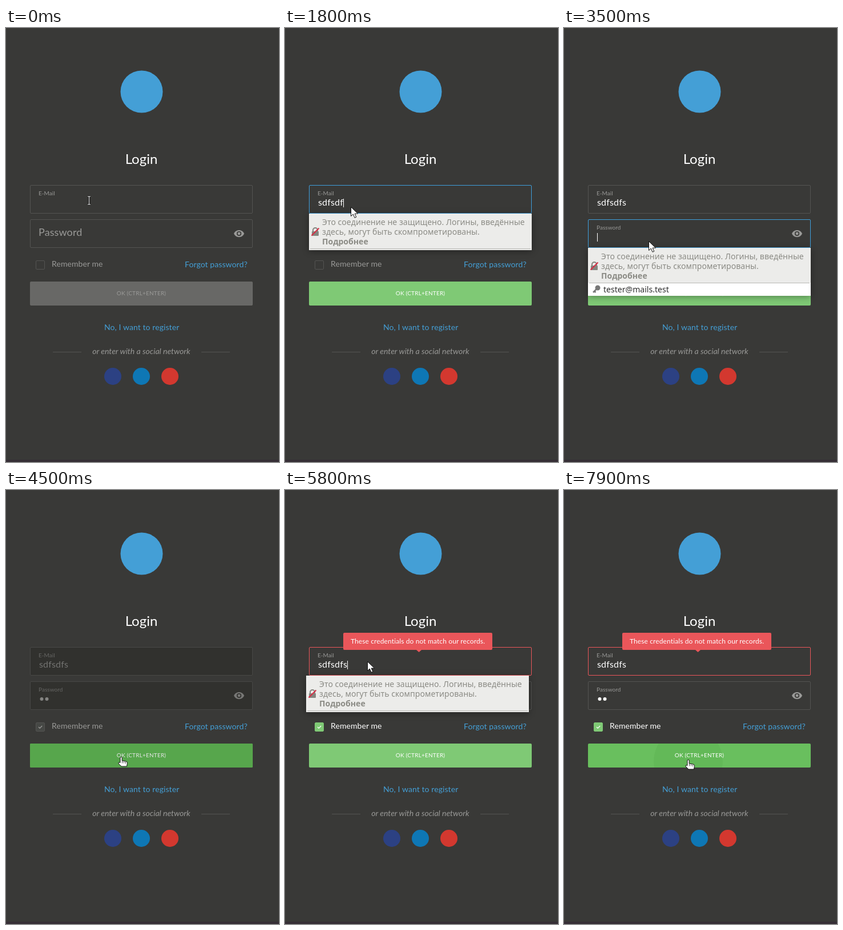
These frames come from a looping animation (478x760 px, 8 s). An HTML page:

```html
<!DOCTYPE html>
<html lang="en">
<head>
<meta charset="utf-8">
<title>Login form</title>
<style>
html, body { margin: 0; width: 100%; height: 100%; overflow: hidden; background: #393937; }
svg { display: block; }
text { font: 14px Lato, sans-serif; letter-spacing: .006em; fill: #999997; }
.small { font-size: 10px; }
.input { font-size: 16px; letter-spacing: .01em; }
.link { fill: #449fd6; }
.mid { text-anchor: middle; }
.box { fill: #31312e; stroke: #545452; }
#popup { filter: drop-shadow(0 2px 6px rgba(0, 0, 0, .35)); }
#popup text { font-family: "Noto Sans", "Open Sans", sans-serif; letter-spacing: .002em; fill: #8b8b85; }
</style>
</head>
<body>
<svg width="478" height="760" viewBox="0 0 478 760">
  <rect y="756" width="478" height="4" fill="#362f36"/>
  <circle cx="237.5" cy="111.5" r="37" fill="#449fd6"/>
  <text class="mid" x="237" y="238" style="font-size:24px;letter-spacing:0;fill:#fff">Login</text>

  <g id="email">
    <rect id="emailBox" class="box" x="42.5" y="275.5" width="389" height="49" rx="1.5"/>
    <text id="emailLabel" class="small" x="57" y="293">E-Mail</text>
    <text class="input" x="58" y="311"><tspan id="emailText"></tspan></text>
    <rect id="emailCaret" y="299" width="1" height="15" fill="#fff"/>
  </g>

  <g id="password">
    <rect id="passBox" class="box" x="42.5" y="335.5" width="389" height="49" rx="1.5"/>
    <text id="passLabel" x="57">Password</text>
    <circle id="dot0" cx="62.5" cy="366" r="3"/>
    <circle id="dot1" cx="71.5" cy="366" r="3"/>
    <rect id="passCaret" y="359" width="1" height="15" fill="#fff"/>
    <path id="eye" fill-rule="evenodd" transform="translate(398.2 350.2) scale(.82)" d="M12 4.5C7 4.5 2.7 7.6 1 12c1.7 4.4 6 7.5 11 7.5s9.3-3.1 11-7.5c-1.7-4.4-6-7.5-11-7.5zM12 17a5 5 0 1 1 0-10 5 5 0 0 1 0 10zm0-8a3 3 0 1 0 0 6 3 3 0 0 0 0-6z"/>
  </g>

  <rect id="check" x="52.5" y="407.5" width="15" height="15" rx="1.5"/>
  <path id="checkMark" d="M57 415l2.2 2.2 4-4.2" fill="none" stroke-width="1.2"/>
  <text id="remember" x="80" y="418">Remember me</text>
  <text class="link" x="313" y="419">Forgot password?</text>

  <clipPath id="clip"><rect x="42" y="444" width="390" height="42" rx="2"/></clipPath>
  <g clip-path="url(#clip)">
    <rect id="button" x="42" y="444" width="390" height="42"/>
    <circle id="ripple" cy="475" fill="#54a349"/>
  </g>
  <text id="buttonText" class="small mid" x="237" y="468" style="letter-spacing:.02em">OK (CTRL+ENTER)</text>

  <text class="link" x="172" y="529">No, I want to register</text>
  <path d="M82 567.5h50M342 567.5h50" stroke="#545452"/>
  <text class="mid" x="237" y="571" style="font-style:italic;letter-spacing:0">or enter with a social network</text>
  <circle cx="187" cy="610" r="15" fill="#2c4183"/>
  <circle cx="237" cy="610" r="15" fill="#0e77b5"/>
  <circle cx="287" cy="610" r="15" fill="#d3382f"/>

  <g id="error">
    <path d="M104 250H361q2 0 2 2V278q0 2-2 2H239l-4.5 4-4.5-4H104q-2 0-2-2V252q0-2 2-2z" fill="#ea565a"/>
    <text class="mid" x="232.5" y="269" style="font-size:12px;letter-spacing:.01em;fill:#fff">These credentials do not match our records.</text>
  </g>

  <g id="popup">
    <rect id="popupBack" width="390"/>
    <rect width="390" height="61" fill="#ececea"/>
    <path d="M2 61.5H388" stroke="#b9b9b5"/>
    <path d="M7 32v-3a4 4 0 0 1 8 0v3" fill="none" stroke="#85857f" stroke-width="2"/>
    <rect x="5" y="31" width="12" height="8" rx="1" fill="#85857f"/>
    <path d="M4.5 38.5L17.5 25.5" stroke="#d92d45" stroke-width="2"/>
    <text x="23" y="20">Это соединение не защищено. Логины, введённые</text>
    <text x="23" y="37">здесь, могут быть скомпрометированы.</text>
    <text x="23" y="54" style="font-weight:700">Подробнее</text>
    <g id="saved">
      <path d="M9 78l6-6m-3.500 4l2 2" stroke="#777" stroke-width="2.5"/>
      <circle cx="17" cy="70" r="4.5" fill="#777"/>
      <text x="27" y="78" style="fill:#2e2e2e">tester@mails.test</text>
    </g>
  </g>

  <g id="cursor" fill="#fff" stroke="#111">
    <g id="beam">
      <path d="M-2.5-7.5h5M-2.5 6.5h5M0-7.5v14" stroke-width="3"/>
      <path d="M-2.5-7.5h5M-2.5 6.5h5M0-7.5v14" stroke="#fff"/>
    </g>
    <path id="arrow" d="M0 0V16l3.8-3.5 2.7 6.3 2.8-1.2-2.7-6H12z"/>
    <g id="hand">
      <path d="M-1.5 10V1.5a1.6 1.6 0 0 1 3.2 0V6.500l7 1.2q2.300.6 2.300 2.800l-1 6H.5L-4.5 11.500q-.5-2.500 1.500-2z"/>
      <path d="M2 7v4M5 8v3M8 8.500v3" stroke-width=".8"/>
    </g>
  </g>
</svg>
<script>
const LOOP = 8000, STEP = 100, NEVER = 9999;
const GREY = '#545452', BLUE = '#3f9fdc', RED = '#ea565a', GREEN = '#7fc975';

// Click on the button and the server's answer to it
const submits = [[4100, 4830], [6250, 6830], [7810, NEVER]];

// time, x, y of the pointer's tip
const route = [
  [0, 145.5, 302.5], [1400, 145.5, 302.5], [1700, 115.5, 313.5], [2400, 115.5, 313.5],
  [2800, 148.5, 373.5], [3650, 148.5, 373.5], [3850, 60.5, 412.5], [3950, 60.5, 412.5],
  [4100, 201.5, 467.5], [4900, 201.5, 467.5], [5400, 144.5, 300.5], [5950, 144.5, 300.5],
  [6200, 206.5, 470.5], [6700, 206.5, 470.5], [6900, 211.5, 472.5], [7300, 211.5, 472.5],
  [7600, 217.5, 472.5], [LOOP, 217.5, 472.5]
];

const el = {};
document.querySelectorAll('[id]').forEach(e => el[e.id] = e);

const ramp = (t, from, length) => Math.min(1, Math.max(0, (t - from) / length));
const within = (t, from, to) => t >= from && t < to;
const lerp = (a, b, k) => a + (b - a) * k;
const channels = hex => [1, 3, 5].map(i => parseInt(hex.slice(i, i + 2), 16));
function mix(a, b, k) {
  const to = channels(b);
  return `rgb(${channels(a).map((v, i) => Math.round(lerp(v, to[i], k)))})`;
}
const show = (id, on) => el[id].style.display = on ? '' : 'none';
const fill = (id, color) => el[id].style.fill = color;
const stroke = (id, color) => el[id].style.stroke = color;
function set(id, attrs) {
  for (const name in attrs) el[id].setAttribute(name, attrs[name]);
}

function pointer(t) {
  const i = route.findIndex(p => p[0] > t);
  const [t0, x0, y0] = route[i - 1], [t1, x1, y1] = route[i];
  const k = ramp(t, t0, t1 - t0), s = k * k * (3 - 2 * k);
  return [lerp(x0, x1, s), lerp(y0, y1, s)];
}

function drawEmail(t, dim, failed, answered) {
  const since = t - answered;
  const shake = within(since, 0, 560) ? -5 * Math.sin(since / 280 * 2 * Math.PI) : 0;
  set('email', { transform: `translate(${shake} 0)` });
  const typed = t < 1400 ? 0 : Math.min(7, Math.floor((t - 1300) / 85) + 1);
  el.emailText.textContent = 'sdfsdfs'.slice(0, typed);
  fill('emailText', mix('#ffffff', '#737371', dim));
  fill('emailLabel', mix('#999997', '#666664', dim));
  const focus = ramp(t, 0, 300) * (1 - ramp(t, 2800, 200));
  stroke('emailBox', failed ? mix(RED, GREY, dim)
    : focus ? mix(GREY, BLUE, focus) : mix(GREY, '#484846', dim));
  el.emailBox.style.fillOpacity = dim;
  set('emailCaret', { x: Math.round(58 + el.emailText.getComputedTextLength()) });
  show('emailCaret', within(t, 100, 2800) || within(t, 4830, 6250) || within(t, 6830, 7810));
}

function drawPassword(t, dim) {
  const float = ramp(t, 2800, 250);
  const focus = ramp(t, 2800, 200) * (1 - ramp(t, 3850, 200));
  el.passLabel.style.fontSize = lerp(18, 10, float) + 'px';
  set('passLabel', { y: lerp(364, 353, float) });
  fill('passLabel', mix('#999997', '#666664', dim));
  stroke('passBox', focus ? mix(GREY, BLUE, focus) : mix(GREY, '#484846', dim));
  el.passBox.style.fillOpacity = dim;
  const dots = (t >= 3600) + (t >= 3700);
  for (const i of [0, 1]) {
    show('dot' + i, i < dots);
    fill('dot' + i, mix('#ffffff', '#848482', dim));
  }
  set('passCaret', { x: 58 + 9 * dots });
  show('passCaret', within(t, 2900, 3900));
  fill('eye', mix('#999997', '#777775', dim));
}

function drawCheck(t, dim) {
  const on = t >= 3900;
  fill('check', mix(on ? GREEN : '#393937', '#464845', dim));
  stroke('check', mix(on ? GREEN : GREY, GREY, dim));
  stroke('checkMark', mix('#ffffff', '#a0a09e', dim));
  show('checkMark', on);
  fill('remember', mix('#999997', '#ffffff', on * (1 - dim)));
}

function drawButton(t, dim, hover, click, answered, x) {
  const active = ramp(t, 1400, 200);
  fill('button', hover ? '#69bf5e' : mix('#686866', GREEN, active));
  fill('buttonText', mix('#9b9b99', '#ffffff', active * (1 - .25 * dim)));
  const since = t - click;
  const opacity = .85 * ramp(since, 0, 300) * (1 - ramp(t, answered, 300));
  set('ripple', { cx: x, r: Math.max(0, since * .67), opacity });
}

function drawPopup(t) {
  const first = within(t, 700, 2800), pass = within(t, 3200, 3600);
  const again = within(t, 4930, 6250) || within(t, 6940, 7810);
  show('popup', first || pass || again);
  show('saved', pass);
  set('popup', { transform: `translate(${again ? 37 : 42} ${pass ? 385 : 325})` });
  set('popupBack', { height: pass ? 84 : 64 });
  fill('popupBack', pass ? '#ffffff' : '#ececea');
}

function render(t) {
  const [x, y] = pointer(t);
  const [click, answered] = submits.filter(s => t >= s[0]).pop() || [NEVER, NEVER];
  const dim = ramp(t, click + 100, 150) * (1 - ramp(t, answered, 150));
  const failed = t >= 4830 && (t >= answered || t < click + 100);
  const overButton = within(y, 444, 486);
  const overCheck = y > 400 && x < 75;

  drawEmail(t, dim, failed, answered);
  drawPassword(t, dim);
  drawCheck(t, dim);
  drawButton(t, dim, overButton, click, answered, x);
  drawPopup(t);
  show('error', failed);

  set('cursor', { transform: `translate(${x} ${y})` });
  const hand = overButton || overCheck, beam = t < 1400;
  show('hand', hand);
  show('beam', beam);
  show('arrow', !hand && !beam);
}

const start = performance.now();
function play() {
  const t = (performance.now() - start) % LOOP;
  render(Math.floor(t / STEP) * STEP);
  requestAnimationFrame(play);
}
render(0);
requestAnimationFrame(play);
</script>
</body>
</html>
```
